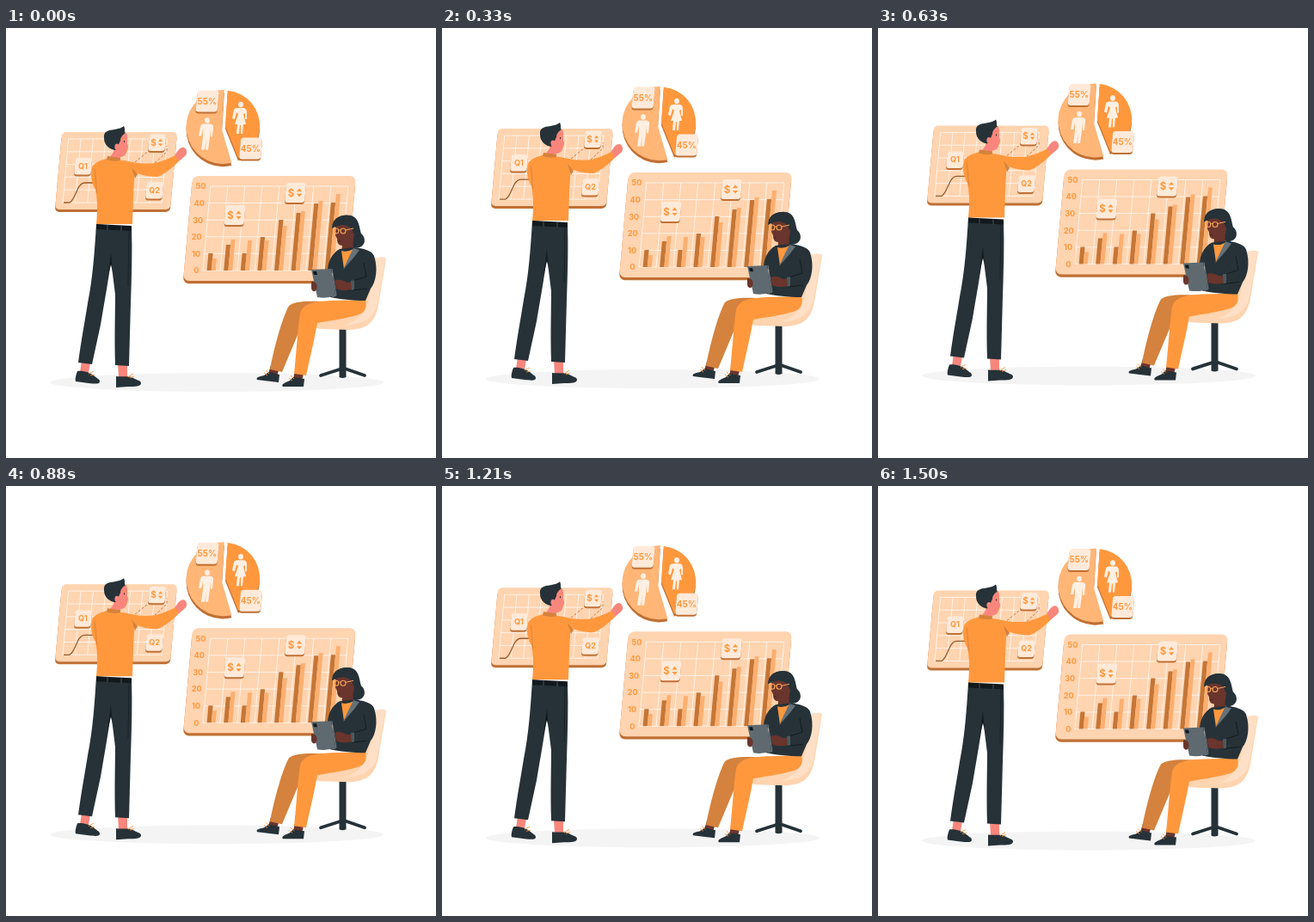
These frames come from a looping animation (500x500 px, 1540 ms). An HTML page with a canvas:

```html
<!DOCTYPE html>
<html lang="en">
<head>
<meta charset="utf-8">
<title>Data presentation</title>
<style>
html, body { margin: 0; width: 100%; height: 100%; overflow: hidden; background: #fff; }
canvas { display: block; width: 500px; height: 500px; }
</style>
</head>
<body>
<canvas id="stage"></canvas>
<script>
const canvas = document.getElementById('stage');
const ctx = canvas.getContext('2d');
const scale = Math.max(1, window.devicePixelRatio || 1);
canvas.width = canvas.height = 500 * scale;

const LOOP = 1540, PEAK = 720, SPEED = 0.012, SLANT = 0.09;
const ORANGE = '#ff983d', PEACH = '#ffd4b0', CREAM = '#ffead9', LIGHT = '#ffb677';
const BROWN = '#c07035', SHADE = '#d4823d', DARK = '#263238', BLACK = '#11191d';
const PINK = '#f9867c', SKIN = '#6a352c', GREY = '#5f6a70';

function fill(color, path) {
  ctx.fillStyle = color;
  ctx.fill(new Path2D(path));
}

function stroke(color, width, path, dash = []) {
  ctx.strokeStyle = color;
  ctx.lineWidth = width;
  ctx.setLineDash(dash);
  ctx.stroke(new Path2D(path));
}

function oval(color, x, y, rx, ry = rx) {
  ctx.fillStyle = color;
  ctx.beginPath();
  ctx.ellipse(x, y, rx, ry, 0, 0, Math.PI * 2);
  ctx.fill();
}

function label(text, x, y, size, align = 'center') {
  ctx.fillStyle = ORANGE;
  ctx.font = `700 ${size}px Inter, "Open Sans", sans-serif`;
  ctx.textAlign = align;
  ctx.textBaseline = 'alphabetic';
  ctx.fillText(text, x, y + size * 0.36);
}

// Runs draw() in slanted space with the origin at the given bottom left corner.
function slanted(x, bottom, draw) {
  ctx.save();
  ctx.transform(1, 0, -SLANT, 1, x, bottom);
  draw();
  ctx.restore();
}

function slab(x, y, w, h, r, face, depth) {
  slanted(x, y + h, () => {
    for (const [color, shift] of [[BROWN, depth], [face, 0]]) {
      ctx.fillStyle = color;
      ctx.beginPath();
      ctx.roundRect(0, -h + shift, w, h, r);
      ctx.fill();
    }
  });
}

function tile(x, y, size, text, fontSize) {
  slab(x, y, size, size, 3.5, CREAM, 2);
  const cx = x + size / 2 + 0.8, cy = y + size / 2;
  if (text !== '$') return label(text, cx, cy, fontSize);
  const s = size / 22;
  label('$', cx - 4.5 * s, cy, fontSize);
  const ax = cx + 4.5 * s;
  for (const dir of [-1, 1]) {
    fill(ORANGE, `M${ax - 3 * s} ${cy + dir * 1.3 * s}H${ax + 3 * s}L${ax} ${cy + dir * 4.8 * s}Z`);
  }
}

function grid(x, bottom, w, h, cols, rows) {
  slanted(x, bottom, () => {
    let path = '';
    for (let i = 0; i <= cols; i++) path += `M${w * i / cols} 0V${-h}`;
    for (let j = 0; j <= rows; j++) path += `M0 ${-h * j / rows}H${w}`;
    stroke('rgba(255,255,255,.75)', 0.9, path);
  });
}

function lineBoard() {
  slab(57, 121, 134, 90, 5, PEACH, 3);
  grid(66, 203, 115, 74, 8, 5);
  stroke('#9b5b2a', 1.3, 'M67 203H74C82 198 82 180 92 180H104');
  stroke(BROWN, 0.9, 'M150 156L167 142M173 157L187 144V137', [3, 2]);
  tile(79, 151, 19.5, 'Q1', 9);
  tile(162, 179, 19.5, 'Q2', 9);
  tile(165, 123.5, 19.5, '$', 10);
}

function slice(color, apex, cx, cy, r, from, to, reverse) {
  for (const [tone, shift] of [[BROWN, 3.2], [color, 0]]) {
    ctx.fillStyle = tone;
    ctx.beginPath();
    ctx.moveTo(apex[0], apex[1] + shift);
    ctx.arc(cx, cy + shift, r, from, to, reverse);
    ctx.fill();
  }
}

function person(x, y, skirt) {
  ctx.save();
  ctx.translate(x, y);
  oval('#fff0e4', 1, 0, 2.9, 3.2);
  fill('#fff0e4', skirt
    ? 'M-3 4H5Q8 5 8 9V17H6V10L4 11L7 23H4L3 34H1V24H0L-1 34H-4L-3 23H-6L-2 11L-4 9L-6 17L-9 16L-7 6Q-6 4-3 4Z'
    : 'M-4 4H5Q9 5 8 9L7 19H5V10L4 20L2 34H-1L0 21L-2 34H-6L-4 20V10L-6 18H-9L-7 7Q-6 4-4 4Z');
  ctx.restore();
}

function pie() {
  slice(LIGHT, [251, 118], 252.5, 115, 43, -1.54, 1.34, true);
  slice(ORANGE, [255, 114], 254, 113.5, 41, -1.48, 1.17, false);
  person(233, 107.5, false);
  person(272, 89, true);
  tile(220.5, 72.5, 25, '55%', 10);
  tile(271, 127.5, 25, '45%', 10);
}

function barBoard() {
  slab(206, 172, 190, 122, 7, PEACH, 3.2);
  grid(229, 282, 160, 98, 8, 5);
  for (let i = 0; i <= 5; i++) {
    label(i * 10, 224.5 + i * 1.6, 282 - i * 19.6, 9.2, 'right');
  }
  const dark = [20, 30, 20, 39, 59, 67, 78, 79];
  const pale = [14, 36, 35, 35, 52, 69, 81, 89];
  dark.forEach((height, i) => slanted(233.6 + i * 19.6, 282, () => {
    ctx.fillStyle = '#c57636';
    ctx.fillRect(0, -height, 5.2, height);
    ctx.fillStyle = '#fbaf70';
    ctx.fillRect(5.2, -pale[i], 4.9, pale[i]);
  }));
  tile(324, 180, 23, '$', 11.5);
  tile(253.5, 206, 23, '$', 11.5);
}

function man() {
  fill(PINK, 'M88 387L98 389L96 401L86 400ZM130 390H141V406H131Z');
  fill(DARK, 'M83 399C90 398 98 401 102 404C106 408 109 408 109 411C109 414 105 414 96 413L81 411C80 407 82 402 83 399Z');
  fill(DARK, 'M128 405C136 406 143 404 148 407C153 410 157 410 157 413C157 417 150 417 142 417L128 418Z');
  stroke(ORANGE, 0.9, 'M96 402L102 399M98 404L103 403M142 406L148 402M144 407L149 405');
  fill(DARK, 'M105 228L146 232C147 260 146 290 145 320L143 393L127 392C126 360 127 330 127 310L122 270C119 295 114 320 110 345L100 391L84 389C88 360 91 345 95 320C101 290 103 260 105 228Z');
  fill(BLACK, 'M122 262L118 292L122 275L124 284Z');
  stroke(BLACK, 0.7, 'M143 236L142 300');

  fill(PINK, 'M131 126L140 122C142 128 141 131 141 135C143 138 142 140 141 142C140 148 136 150 133 150L132 154L118 153C122 149 125 145 126 141Z');
  fill(DARK, 'M114 128C113 120 119 119 126 118C131 117 135 116 137 114C139 117 137 121 139 122C135 125 133 127 133 131C131 134 131 138 127 142C121 141 114 137 114 128Z');
  oval(PINK, 129, 138, 2.6, 3.5);
  stroke(DARK, 1, 'M137.5 131V133');
  stroke(ORANGE, 1, 'M136 129.5L140 129.5M139 143L141 142.5');
  fill(PINK, 'M196 149C199 143 203 138 207 139C211 141 211 147 208 149L201 155Z');

  fill(ORANGE, 'M117 152C128 154 136 153 142 155L147 156C155 158 166 158 174 157C184 154 191 151 197 148L201 155C192 164 184 170 176 173C168 173 157 171 150 168C148 182 148 204 147 228H105C107 210 106 198 104 188C98 178 98 165 101 160C106 155 112 153 117 152Z');
  fill(SHADE, 'M118 149L133 151L133 154Q125 156 117 153ZM146 162L153 170L150 175Z');
  stroke(SHADE, 0.9, 'M103 164C105 173 104 182 106 192');
  fill(BLACK, 'M105 228L146 230V236L105 234Z');
  stroke('#4a555a', 1, 'M118 229V235M134 230V236');
}

function chair() {
  fill(DARK, 'M387.5 348H395.5V406Q391 408 387.5 406Z');
  ctx.lineCap = 'round';
  stroke(DARK, 3.8, 'M391 396L366 404M391 395L417 404');
  ctx.lineCap = 'butt';
  fill(PEACH, 'M431 268C435 266 441 266 442 268L433 322C429 344 418 350 400 351L366 350C357 349 355 344 362 337L412 325C420 315 424 290 431 268Z');
  fill('#ffe0c6', 'M429 267H441L432 320C428 338 416 344 392 346C420 338 424 320 429 267Z');
}

function womanLegs() {
  fill(SKIN, 'M308 392L318 395L315 405L305 402ZM336 399L346 402L344 410L334 408Z');
  fill(SHADE, 'M378 319C355 317 336 317 329 323C322 335 312 370 307 397L321 400L342 350L378 330Z');
  fill(ORANGE, 'M378 317L418 316C420 325 418 331 408 334C390 339 372 341 362 343C358 365 353 385 349 404L335 402C338 375 339 350 342 332C345 320 358 318 378 317Z');
  fill(DARK, 'M306 400L318 403L317 412C308 411 300 410 292 409C290 406 296 405 300 404Z');
  fill(DARK, 'M334 406L347 408L346 417L322 417C319 414 326 412 330 410Z');
  stroke(ORANGE, 0.9, 'M302 398L306 402M300 401L304 404M331 404L335 408M329 407L333 410');
}

function womanHead() {
  fill(DARK, 'M380 228C383 218 398 215 405 220C411 224 411 234 413 239C419 244 418 253 411 255C405 257 400 254 399 250Z');
  fill(SKIN, 'M384 230C389 230 396 227 401 227L405 240C404 246 403 250 404 257L390 261L391 253C386 253 385 249 385 245L383 241Z');
  fill(DARK, 'M379 233C379 222 388 217 397 218C406 218 411 226 411 237L404 239C402 231 396 229 390 229C384 229 382 232 379 233Z');
  ctx.strokeStyle = '#f5a45c';
  ctx.lineWidth = 1.1;
  for (const x of [384.5, 392]) {
    ctx.beginPath();
    ctx.ellipse(x, 236, x < 390 ? 2.2 : 3, 3, 0, 0, Math.PI * 2);
    ctx.stroke();
  }
  stroke('#f5a45c', 1, 'M387 235H389M395 235L404 233');
  stroke('#3d1c18', 0.8, 'M386 248H389');
}

function womanBody() {
  fill(DARK, 'M388 257L405 255C415 256 426 259 428 265C433 280 430 296 424 303L418 317C403 317 386 315 377 313L380 285L374 283C374 272 379 262 388 257Z');
  fill(ORANGE, 'M390 259Q397 261 404 257L393 280Z');
  fill('#667279', 'M404 256L411 258L405 266L392 281L399 266Z');
  stroke(BLACK, 0.9, 'M416 273L419 289L403 294M420 303L402 305');
  fill(GREY, 'M355 281L378 280C380 290 382 300 383 311Q373 315 362 313Z');
  fill(BLACK, 'M357 283H361L362 287H358Z');
  stroke('#849096', 0.8, 'M379 280L384 311L379 313');
  fill(SKIN, 'M355 295C360 294 363 299 361 304C359 308 355 306 355 302ZM382 294C388 291 393 294 397 296L404 295V304C396 305 389 306 384 303Z');
  fill('#4e595f', 'M401 294L405 293V304L402 305Z');
}

function draw(now) {
  const away = Math.abs(now % LOOP - PEAK);
  const distance = Math.min(away, LOOP - away);
  ctx.setTransform(scale, 0, 0, scale, 0, 0);
  ctx.fillStyle = '#fff';
  ctx.fillRect(0, 0, 500, 500);
  ctx.translate(0, (distance - PEAK) * SPEED);

  oval('#f4f4f4', 245, 412, 194, 11);
  lineBoard();
  pie();
  barBoard();
  man();
  chair();
  womanLegs();
  womanHead();
  womanBody();
}

const start = performance.now();
function tick() {
  draw(performance.now() - start);
  requestAnimationFrame(tick);
}
tick();
</script>
</body>
</html>
```
